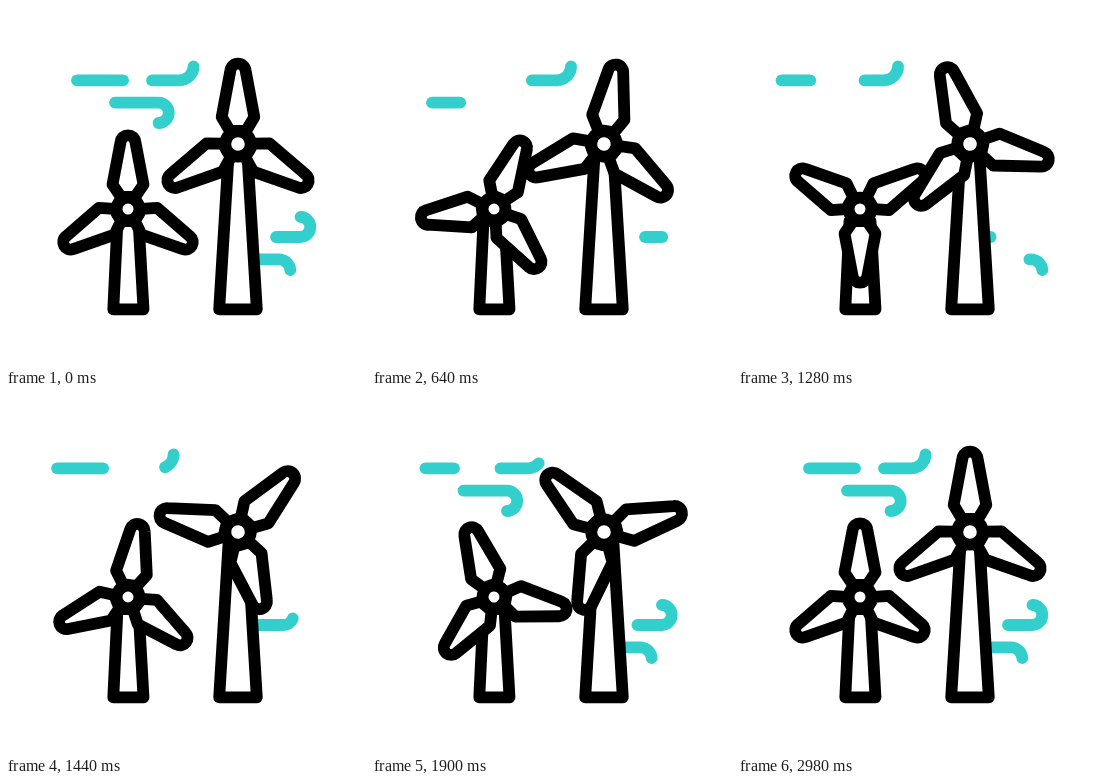
Write an HTML page that moves like this. It is 360 px wide and 360 px high and loops after 3 s.

```html
<!DOCTYPE html>
<html lang="en">
<head>
<meta charset="utf-8">
<title>Wind turbines</title>
<style>
  html, body { margin: 0; width: 100%; height: 100%; overflow: hidden; background: #fff; }
  svg { display: block; width: 100%; height: 100%; stroke-width: 11.8; stroke-linecap: round; stroke-linejoin: round; }
  #wind { fill: none; stroke: #33cfcd; }
  #turbines { fill: #fff; stroke: #000; }
</style>
</head>
<body>
<svg viewBox="0 0 360 360">
  <g id="wind"></g>
  <g id="turbines"></g>
</svg>
<script>
const LOOP = 3000, SPIN = 2400;
const clamp = v => Math.min(1, Math.max(0, v));
const ramp = (t, a, b) => clamp((t - a) / (b - a));

function add(parent, tag, attrs) {
  const el = document.createElementNS('http://www.w3.org/2000/svg', tag);
  for (const k in attrs) el.setAttribute(k, attrs[k]);
  return parent.appendChild(el);
}

// cubic-bezier(.7, 0, .36, 1)
function spinEase(x) {
  let lo = 0, hi = 1, s = 0.5;
  for (let i = 0; i < 24; i++) {
    s = (lo + hi) / 2;
    const r = 1 - s;
    if (3 * r * r * s * 0.7 + 3 * r * s * s * 0.36 + s ** 3 < x) lo = s; else hi = s;
  }
  return s * s * (3 - 2 * s);
}

// Each gust drifts by drift[i] on pass i; every line gives, per pass,
// the times [draw start, draw end, erase start, erase end].
const START = [-2, -1], STAY = [1e5, 1e6];
const gusts = [
  {
    drift: [
      t => 0.018 * t,
      t => { const k = (t - 640) / 320; return -49 + 7.25 * k + 1.75 * k * k; },
      t => -46 * (1 - ramp(t, 1560, 2800)) ** 3
    ],
    lines: [
      ['M71 74.3H117', [...START, 180, 560], [1150, 1360, 1470, 1740], [1740, 2000, ...STAY]],
      ['M146 74.3H173.5A14 14 0 0 0 187.5 60.3', [...START, 625, 965], [870, 1150, 1230, 1545], [1660, 1960, ...STAY]],
      ['M109 96.6H152.5A10.2 10.2 0 0 1 152.5 117', [...START, 120, 520], [540, 810, 870, 1190], [1550, 1860, ...STAY]]
    ]
  },
  {
    drift: [
      t => 0.014 * t,
      t => 3 + 0.0266 * (t - 640),
      t => -10.5 * (1 + Math.cos(Math.PI * ramp(t, 1100, 2260)))
    ],
    lines: [
      ['M270 231H294A10 10 0 1 0 294.5 211', [...START, 150, 540], [560, 820, 890, 1100], [1270, 1530, ...STAY]],
      ['M249 253.3H272.5A11.5 11.5 0 0 1 284.3 264', [...START, 100, 450], [830, 1060, 1150, 1390], [1620, 1900, ...STAY]]
    ]
  }
];

const wind = document.getElementById('wind');
const strokes = gusts.flatMap(({ drift, lines }) =>
  lines.flatMap(([d, ...passes]) => passes.map((times, i) => ({
    times, drift: drift[i], el: add(wind, 'path', { d, pathLength: 100 })
  }))));

const turbines = [
  { x: 122, y: 203, delay: 27, hub: 11.4,
    tower: 'M107.3 303.3L111.5 215H132.5L137.5 303.3Z',
    blade: 'M-7 -12L-15.5 -24.5L-7.3 -67.5A7.4 7.4 0 0 1 7.3 -67.5L15.5 -24.5L7 -12Z' },
  { x: 232, y: 138, delay: 225, hub: 12.7,
    tower: 'M213.2 303.3L222.5 150H241.5L250.8 303.3Z',
    blade: 'M-8 -13L-16.3 -27L-7.5 -74A7.6 7.6 0 0 1 7.5 -74L16.3 -27L8 -13Z' }
];
for (const m of turbines) {
  const g = add(document.getElementById('turbines'), 'g', {});
  add(g, 'path', { d: m.tower });
  m.rotor = add(g, 'g', {});
  for (const a of [0, 120, 240]) add(m.rotor, 'path', { d: m.blade, transform: `rotate(${a})` });
  add(m.rotor, 'circle', { r: m.hub });
}

function draw(t) {
  for (const { el, times: [a, b, c, d], drift } of strokes) {
    const from = 100 * ramp(t, c, d), to = 100 * ramp(t, a, b);
    el.style.display = t >= a && t < d && to >= from ? '' : 'none';
    el.setAttribute('transform', `translate(${drift(t)})`);
    el.setAttribute('stroke-dasharray', `${Math.max(0.01, to - from)} 300`);
    el.setAttribute('stroke-dashoffset', -from);
  }
  for (const m of turbines) {
    const angle = 360 * spinEase(ramp(t, m.delay, m.delay + SPIN));
    m.rotor.setAttribute('transform', `translate(${m.x} ${m.y}) rotate(${angle})`);
  }
}

function tick() {
  draw(performance.now() % LOOP);
  requestAnimationFrame(tick);
}
tick();
</script>
</body>
</html>
```
